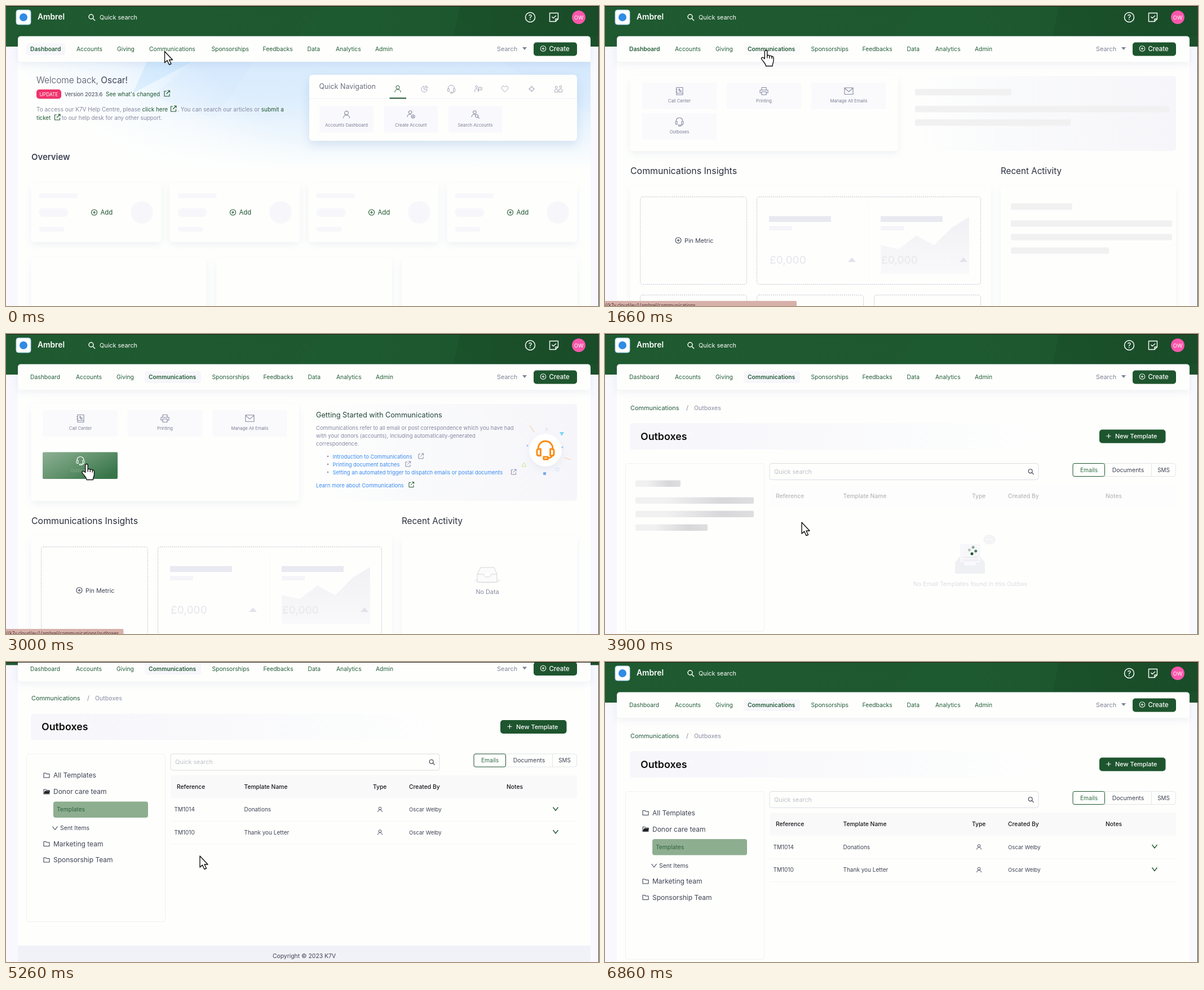
These frames come from a looping animation (1052x532 px, 7.86 s). An HTML page:

```html
<!DOCTYPE html>
<html lang="en">
<head>
<meta charset="utf-8">
<title>Outbox walkthrough</title>
<style>
  html, body { margin: 0; width: 100%; height: 100%; overflow: hidden; background: #f8f8fe; }
  svg { display: block; width: 100vw; height: 100vh; font-family: Inter, "Open Sans", sans-serif; }
</style>
</head>
<body>
<svg id="stage" viewBox="0 0 1052 532"></svg>
<script>
const LOOP = 7860;
const GREEN = '#1e552e', INK = '#3f4254', GREY = '#8688a0', PAPER = '#fefffd', PALE = '#f7f7fb', BLUE = '#3a8bee';

// Drawing helpers: each returns SVG markup
const T = (x, y, s, size, fill = INK, weight = 400, anchor = 'start') =>
  `<text x="${x}" y="${y}" font-size="${size}" fill="${fill}" font-weight="${weight}" text-anchor="${anchor}">${s}</text>`;
const R = (x, y, w, h, fill, r = 0, extra = '') =>
  `<rect x="${x}" y="${y}" width="${w}" height="${h}" rx="${r}" fill="${fill}" ${extra}/>`;
const C = (x, y, r, fill, extra = '') => `<circle cx="${x}" cy="${y}" r="${r}" fill="${fill}" ${extra}/>`;
const P = (d, fill, extra = '') => `<path d="${d}" fill="${fill}" ${extra}/>`;
const G = (id, body, extra = '') => `<g id="${id}" ${extra}>${body}</g>`;
const span = (s, fill, weight = 400) => `<tspan fill="${fill}" font-weight="${weight}">${s}</tspan>`;
const card = (x, y, w, h, id = '') => R(x, y, w, h, PAPER, 5, `filter="url(#shadow)" ${id && `id="${id}"`}`);
const dashed = (x, y, w, h) => R(x, y, w, h, 'none', 4, 'stroke="#b9bac6" stroke-dasharray="2 1.5" stroke-width=".9"');
const ring = r => `M${-r} 0a${r} ${r} 0 1 0 ${2 * r} 0a${r} ${r} 0 1 0 ${-2 * r} 0`;

const ICONS = {
  plus: ring(5) + 'M-2.5 0H2.5M0-2.5V2.5',
  cross: 'M-4 0H4M0-4V4',
  search: 'M-5-1a4 4 0 1 0 8 0a4 4 0 1 0-8 0M2 2L6 6',
  link: 'M-1-4H-4.5V5H4.5V1M1-5H5V-1M5-5L-1 1',
  person: 'M-3.3-2.8a3.3 3.3 0 1 0 6.6 0a3.3 3.3 0 1 0-6.6 0M-5.5 6.5C-5.5-1 5.5-1 5.5 6.5',
  personAdd: 'M-4-4a2.8 2.8 0 1 0 5.6 0a2.8 2.8 0 1 0-5.6 0M-6.5 4.5C-6.5 0-3-1 0-.4M1 3.5a3 3 0 1 0 6 0a3 3 0 1 0-6 0M2.5 3.5h3M4 2v3',
  personFind: 'M-4-4a2.8 2.8 0 1 0 5.6 0a2.8 2.8 0 1 0-5.6 0M-6.5 4.5C-6.5 0-3-1 0-.4M0 2.5a2.5 2.5 0 1 0 5 0a2.5 2.5 0 1 0-5 0M4.5 4.5L7 7',
  pie: 'M-1-5A5.5 5.5 0 1 0 5 1H-1ZM2-6A5 5 0 0 1 6-2H2Z',
  headset: 'M-6 0V-1a6 6 0 0 1 12 0V0M-7 1Q-7-.5-5.500-.5H-4V5H-5.500Q-7 5-7 3.500ZM7 1Q7-.5 5.500-.5H4V5H5.500Q7 5 7 3.500ZM5.500 5Q5 7 2 7M-1.500 6H2V8H-1.500Z',
  talk: 'M-5-4a2 2 0 1 0 4 0a2 2 0 1 0-4 0M-6 6V1Q-3-2 0 1V6M1-3H7V2H3L1 3ZM3-.5H5',
  heart: 'M0 6L-5 .8C-8.5-3.5-3-8 0-3.5C3-8 8.5-3.5 5 .8Z',
  target: ring(3.8) + 'M0-6V-2M0 6V2M-6 0H-2M6 0H2',
  group: 'M-6-3a2 2 0 1 0 4 0a2 2 0 1 0-4 0M2-4a2 2 0 1 0 4 0a2 2 0 1 0-4 0M-7 6V2Q-4-1-1 2V6ZM1 6V1Q4-2 7 1V6Z',
  book: 'M-5-6.5H6V6.5H-5ZM-5 3.5H6M-7-3H-4M-7 1H-4M-1-4Q-2 1 3 1L3-1L1-1L0-4Z',
  printer: 'M-4-2V-6.5H4V-2M-4 3H-7V-2H7V3H4M-4 1H4V6.5H-4Z',
  mail: 'M-7.5-6H7.5V5.5H-7.5ZM-7.5-5.5L0 1L7.5-5.5',
  folder: 'M-5-4H-1L0-2.5H5V4H-5Z',
  chevron: 'M-4.5-3L0 3L4.5-3',
  note: 'M-7.5-7.5H7.5V3L3 7.5H-7.5ZM7 3H3V7M-3.5-1L-1 1.5L4-3'
};
const icon = (name, x, y, color = GREY, scale = 1, width = 1.1) =>
  P(ICONS[name], 'none', `transform="translate(${x} ${y}) scale(${scale})" stroke="${color}" stroke-width="${width}" stroke-linejoin="round"`);

const header = () =>
  R(0, 0, 1052, 72, 'url(#green)') +
  P('M560 0H800L850 72H500Z', '#2b7040', 'opacity=".06"') +
  P('M806 0L794 53H1052V0Z', '#123a1e', 'opacity=".16"') +
  R(18, 7, 26, 26, '#fff', 4, 'stroke="#9fd0ee"') + C(31, 20, 7, '#2f8be6') +
  T(56, 24, 'Ambrel', 13.8, '#fff', 600) +
  icon('search', 152, 20, '#fff', 1, 1.5) + T(166, 23.5, 'Quick search', 10.8, '#fff') +
  C(930, 20, 8.5, 'none', 'stroke="#fff" stroke-width="1.5"') + T(930, 24.5, '?', 12.5, '#fff', 500, 'middle') +
  icon('note', 972, 20, '#fff', 1, 1.4) +
  C(1016, 20, 12, '#f857ab') + T(1016, 23.5, 'OW', 9.5, '#fff', 400, 'middle');

const NAV = ['Dashboard', 'Accounts', 'Giving', 'Communications', 'Sponsorships', 'Feedbacks', 'Data', 'Analytics', 'Admin'];
const NAV_X = {
  home: [43, 125, 197, 254, 364.5, 455.5, 534.5, 585, 655],
  comm: [43, 124, 196, 253, 365.5, 456.5, 535.5, 586, 656]
};
const nav = () =>
  R(21, 53.5, 1016, 45.5, PAPER, 5, 'filter="url(#shadow)"') +
  R(36, 66, 69, 21, PALE, 4, 'id="homePill"') + R(246, 66, 100, 21, PALE, 4, 'id="commPill"') +
  G('links', NAV.map(s => T(0, 80, s, 10.3, '#245c38')).join('')) +
  T(871, 80, 'Search', 10.9, '#7f8298') + P('M916 73H924L920 78Z', '#7f8298') +
  R(936, 64.5, 77, 24, GREEN, 5) + icon('plus', 953, 75.5, '#fff', .95) + T(963.5, 80, 'Create', 11.4, '#fff', 500);

const dashboard = () => {
  const tabs = ['person', 'pie', 'headset', 'talk', 'heart', 'target', 'group'];
  const tiles = [['person', 'Accounts Dashboard'], ['personAdd', 'Create Account'], ['personFind', 'Search Accounts']];
  let out = R(21, 99, 1016, 195, 'url(#sky)') +
    P('M250 99H330L225 155Z', '#b5dbfa', 'opacity=".4"') + P('M330 99H440L370 200L260 160Z', '#c6e2fb', 'opacity=".2"') +
    P('M520 99H760L540 240L410 200Z', '#d5eafc', 'opacity=".25"') + P('M880 99H1037V190L960 150Z', '#c6e2fb', 'opacity=".2"') +
    R(21, 99, 1016, 195, 'url(#skyFade)') +
    T(54, 137, span('Welcome back, ', '#4a4d60', 300) + span('Oscar!', INK), 15.4) +
    R(54, 148, 44, 16.5, '#f0326b', 5) + T(76, 159.5, 'UPDATE', 8.4, '#fff', 400, 'middle') +
    T(104, 160, 'Version 2023.6', 9.4) + T(177, 160, "See what's changed", 10, GREEN) + icon('link', 285.5, 155, GREEN) +
    T(54, 187, 'To access our K7V Help Centre, please ' + span('click here', GREEN), 10, GREY) + icon('link', 297, 182, GREEN) +
    T(304, 187, '. You can search our articles or ' + span('submit a', GREEN), 9.95, GREY) +
    T(54, 202, 'ticket', 9.8, GREEN) + icon('link', 91, 197, GREEN) + T(99, 202, 'to our help desk for any other support.', 9.8, GREY) +
    R(538, 122, 475, 117, PAPER, 6, 'filter="url(#blueShadow)"') + T(555.5, 147, 'Quick Navigation', 12.5, '#6b6f83') +
    R(538, 163.5, 475, 1, '#eff0f5') + R(680.5, 162.5, 29.5, 2, GREEN);
  tabs.forEach((name, i) => out += icon(name, 695 + 47.5 * i, 147, i ? '#a3a5b7' : GREEN, .95, 1));
  tiles.forEach(([name, label], i) => {
    const x = 604 + 114.3 * i;
    out += R(x - 48, 177, 96, 47.5, '#f9f9fd', 3) + icon(name, x, 192.5) + T(x, 213.5, label, 7.7, '#7b7e93', 400, 'middle');
  });
  out += T(45, 272.5, 'Overview', 14.9, INK, 600);
  for (let i = 0; i < 4; i++) {
    const x = 44.5 + 246 * i;
    out += card(x, 314, 230.5, 104.5) + R(x + 14, 332, 69, 9, PALE, 4) + R(x + 14, 358.5, 52, 15.5, PALE, 7) +
      R(x + 14, 391.5, 45, 8.5, PALE, 4) + C(x + 196.5, 366, 20, PALE) + icon('plus', x + 112, 366, GREEN) + T(x + 123, 370, 'Add', 11.4, GREEN);
  }
  for (let i = 0; i < 3; i++) out += card(44.5 + 329 * i, 447, 311, 120);
  return out;
};

const bones = (x, y, widths) =>
  widths.map((w, i) => R(x, y + (i ? 6 + 24 * i : 0), w, 11.5, 'url(#shimmer)', 2)).join('');

const tile = (x, y, name, label) =>
  R(x - 66.5, y, 133, 47, '#fafafd', 2) + icon(name, x, y + 15) + T(x, y + 35.5, label, 7.7, '#7b7e93', 400, 'middle');

const metric = x =>
  R(x, 372.5, 110, 10.5, '#e9e9f1') + R(x, 390, 41, 8, '#f5f5f9') +
  T(x + 1, 456.5, '£0,000', 18.8, '#e8e8ee', 500) + P(`M${x + 140} 454H${x + 154}L${x + 147} 446Z`, '#e2e2ea');

const link = (x, y, s, end) => T(x, y, s, 9.35, BLUE) + icon('link', end, y - 4, GREY, .9);

const guide = () =>
  T(550, 148, 'Getting Started with Communications', 12.7, '#24463a') +
  ['Communications refer to all email or post correspondence which you have had',
   'with your donors (accounts), including automatically-generated', 'correspondence.']
    .map((s, i) => T(550, 170 + 14 * i, s, 9.45, GREY)).join('') +
  [217, 231, 245].map(y => C(571, y, 1.3, GREY)).join('') +
  link(579.5, 220.5, 'Introduction to Communications', 736) + link(579.5, 234.5, 'Printing document batches', 713) +
  link(579.5, 248.5, 'Setting an automated trigger to dispatch emails or postal documents', 900.5) +
  T(550, 271.5, 'Learn more about Communications', 9.4, BLUE) + icon('link', 719, 267, GREEN, .9) +
  C(957, 206, 29, '#fff', 'filter="url(#shadow)"') + icon('headset', 957, 205, '#fa8c16', 2.15, 1.35) +
  P('M929 162L937 174M990 219L1002 223', 'none', 'stroke="#fbc9a4" stroke-width="1.2"') +
  P('M982 174H990L986 181Z', '#7fd6f0') + P('M915 235L919 228L923 235Z', 'none', 'stroke="#c6e58c"') +
  C(959, 169, 2, 'none', 'stroke="#ddd"') + C(978, 240, 2.8, 'none', 'stroke="#cfe0f8"') +
  C(925, 198, 1.5, '#9db9f5') + C(987, 201, 1.5, '#8fc0f5') + R(953, 245, 5, 5, '#7ba8f0', 1);

const communications = () =>
  card(44.5, 124, 475.5, 133, 'tools') +
  G('topTiles', tile(132, 136, 'book', 'Call Center') + tile(282, 136, 'printer', 'Printing') + tile(432.5, 136, 'mail', 'Manage All Emails')) +
  G('outboxTile', tile(132, 190, 'headset', 'Outboxes') +
    G('tileHover', R(65, 190, 133, 47.5, 'url(#hover)', 2) + icon('headset', 132, 205, '#fff') +
      T(132, 225.5, 'Outboxes', 7.7, '#83ad89', 400, 'middle'))) +
  R(532, 124, 481, 133, 'url(#panel)', 5, 'id="panel"') +
  G('guideBones', bones(550, 147, [171, 451, 276])) + G('guide', guide()) +
  G('insights',
    T(45, 297.5, 'Communications Insights', 15.9, '#2b2e3d') + T(702, 297.5, 'Recent Activity', 15.2, '#2b2e3d') +
    card(44.5, 320, 640.5, 260) + card(702, 320, 311, 260) +
    dashed(62.5, 338.5, 189, 155) + dashed(269.5, 338.5, 397, 155) +
    [62.5, 269.5, 477.5].map(x => dashed(x, 512.5, 189, 120)).join('') +
    icon('plus', 130, 415.5, INK) + T(141, 420, 'Pin Metric', 10.8) +
    R(468, 348, 1, 136, '#f7f7fa') +
    P('M489 424L521 431L552 407L584 424L615 393L646 374V475H489Z', 'url(#chart)') + metric(291) + metric(489) +
    G('activityBones', bones(720, 350, [109, 286, 286, 174])) +
    G('noData', '<ellipse cx="854" cy="398.5" rx="23" ry="5" fill="#f4f4f6"/>' +
      P('M836 387L842 375H866L871 387V401H836ZM836 387H847Q848 392 854 392Q860 392 861 387H871', '#fbfbfc', 'stroke="#d5d5da"') +
      T(854, 421.5, 'No Data', 10.8, GREY, 400, 'middle')));

const treeRow = (y, s, open) =>
  icon('folder', 72, y, INK) + (open ? P('M67 300L69 295H78L76 300Z', '#222') : '') + T(84, y + 4, s, 12, INK);

const tableRow = (y, id, name) =>
  T(298.5, y, id, 10) + T(422.5, y, name, 10) + icon('person', 663.5, y - 3.5, INK, .7, 1.4) +
  T(715, y, 'Oscar Welby', 9.6) + icon('chevron', 975, y - 4.5, GREEN, 1, 1.3) + R(292, y + 17, 721, 1, '#f3f3f5');

const outboxes = () =>
  T(45, 134.5, 'Communications', 10.9, '#24583a') + T(144, 134.5, '/', 10.9, GREY) + T(158, 134.5, 'Outboxes', 10.6, GREY) +
  R(44, 158, 786, 47, 'url(#banner)', 5) + T(63, 187.5, 'Outboxes', 17.8, '#0c0d0c', 600) +
  R(877, 169.5, 117.5, 24, GREEN, 5) + icon('cross', 893.5, 181, '#fff') + T(905, 185, 'New Template', 10.9, '#fff', 500) +
  R(36.5, 229.5, 246, 297.5, PAPER, 4, 'stroke="#eff0f2"') +
  G('treeBones', bones(54, 259.5, [80, 210, 210, 128])) +
  G('tree', treeRow(267.5, 'All Templates') + treeRow(296.5, 'Donor care team', true) +
    R(84, 314, 168, 28.5, '#8eae90', 4) + T(90, 331.5, 'Templates', 10.3, '#2f6240') +
    icon('chevron', 87, 361, INK) + T(96, 364.5, 'Sent Items', 10.4) +
    treeRow(389, 'Marketing team') + treeRow(417.5, 'Sponsorship Team')) +
  R(292, 229.5, 477, 29, PAPER, 4, 'stroke="#dcdde0"') + T(300, 247.5, 'Quick search', 10.8, '#bfc0c6') + icon('search', 755.5, 244, INK, .85, 1.4) +
  R(830, 229.5, 182.5, 23, PAPER, 4, 'stroke="#e3e4e8"') + R(969, 230, 1, 23, '#e3e4e8') +
  R(830, 229.5, 56.5, 23, PAPER, 3, `stroke="${GREEN}"`) +
  T(858.5, 244.5, 'Emails', 10.2, '#2f6a45', 400, 'middle') + T(928, 244.5, 'Documents', 10.5, INK, 400, 'middle') + T(991, 244.5, 'SMS', 9.8, INK, 400, 'middle') +
  G('table', R(292, 267.5, 721, 40.5, '#f9f9fa', 2) +
    [['Reference', 303], ['Template Name', 422.5], ['Type', 651], ['Created By', 715], ['Notes', 888]]
      .map(([s, x]) => T(x, 291, s, 10.3, '#17181c', 500)).join('') +
    G('rows', tableRow(331.5, 'TM1014', 'Donations') + tableRow(372, 'TM1010', 'Thank you Letter'))) +
  G('empty', P('M621 405L629 395H666L674 405V425H621Z', '#eff0f4') + R(630, 372, 36, 33, '#f7f7fa', 2) +
    P('M635 396H662M635 401H662', 'none', 'stroke="#e9e9ef" stroke-width="1.5"') + R(637, 405, 21, 5, '#fafafc', 2) +
    '<ellipse cx="682" cy="364.5" rx="11" ry="9" fill="#f4f4f7"/>' + T(682, 366, '•••', 7, '#fff', 400, 'middle') +
    T(648, 447, 'No Email Templates found in this Outbox', 10.6, '#dcdce4', 400, 'middle') +
    G('spinner', [1, .75, .5, .3].map((o, i) =>
      C(0, 5.8, 2.5, GREEN, `opacity="${o}" transform="rotate(${-90 * i})"`)).join(''))) +
  R(21, 569.5, 1016, 40, '#f1f2f7') + T(529, 591.5, 'Copyright © 2023 K7V', 10.4, INK, 400, 'middle');

const stops = list => list.map(([o, c, a = 1]) => `<stop offset="${o}" stop-color="${c}" stop-opacity="${a}"/>`).join('');
const gradient = (id, list, dir = 'x2="1"') => `<linearGradient id="${id}" ${dir}>${stops(list)}</linearGradient>`;
const shadow = (id, color, dy, blur) =>
  `<filter id="${id}" x="-20%" y="-30%" width="140%" height="190%" color-interpolation-filters="sRGB">
    <feDropShadow dx="0" dy="${dy}" stdDeviation="${blur}" flood-color="${color}"/></filter>`;

const stage = document.getElementById('stage');
stage.innerHTML = '<defs>' +
  gradient('green', [[0, '#1f5a30'], [.6, '#1e582f'], [1, '#1b502b']]) +
  gradient('sky', [[0, PAPER], [.55, '#eff7fe'], [1, '#d8ebfd']], 'gradientUnits="userSpaceOnUse" x1="150" y1="230" x2="290" y2="60"') +
  gradient('skyFade', [[0, PAPER, 0], [.35, PAPER, .15], [1, PAPER]], 'x2="0" y2="1"') +
  gradient('panel', [[0, PALE, 0], [.35, PALE, .6], [1, '#f6f6fa']]) +
  gradient('banner', [[0, '#f6f6fb'], [.4, '#f9f9fc'], [1, PAPER]]) +
  gradient('hover', [[0, '#8db095'], [.5, '#65956f'], [1, '#38764a']], 'x2="1" y2=".7"') +
  gradient('chart', [[0, '#f1f1f5'], [1, '#f9f9fb']], 'x2="0" y2="1"') +
  gradient('shimmer', [[.25, '#f1f1f2'], [.37, '#d8d8da'], [.63, '#f1f1f2']]) +
  shadow('shadow', 'rgba(70,80,140,.08)', 5, 7) + shadow('blueShadow', 'rgba(60,110,180,.16)', 7, 9) + '</defs>' +
  R(0, 0, 1052, 532, '#f8f8fe') +
  G('page', header() + R(21, 72, 1016, 600, PAPER) + G('home', dashboard()) + G('comm', communications()) + G('out', outboxes())) +
  G('nav', nav()) +
  G('status', R(-4, 523, 344, 14, '#d8b0aa', 2, 'id="statusBar"') +
    '<text id="address" y="533.5" font-size="8.4" fill="#4b3431" font-family="Noto Sans, sans-serif"></text>') +
  R(0, 0, 1052, 1, '#1d211e') + R(1051, 0, 1, 532, '#3a3d3b') +
  G('cursor',
    P('M0 0V20L4.5 16L8 23.5L11.5 22L8 15H14Z', '#fff', 'id="arrow"') +
    P('M-2.2 2.2C-2.2-.8 2.2-.8 2.2 2.2V10C3 8 6 8.5 6.3 10.5C7 9 10 9.5 10.3 11.5C11 10.2 13.5 11 13.5 13.5V18C13.5 22 11.5 23 11.5 28H0C0 24-5 20-7.5 16C-9.5 13-5.5 11-2.2 15ZM2.2 10V14M6.3 10.5V14.5M10.3 11.5V15', '#fff', 'id="hand"'),
    'stroke="#111" stroke-width="1.4" stroke-linejoin="round"');

const el = Object.fromEntries([...stage.querySelectorAll('[id]')].map(n => [n.id, n]));
const links = [...el.links.children], shimmer = el.shimmer;

// Timing helpers
const ramp = (t, a, b) => Math.min(1, Math.max(0, (t - a) / (b - a)));
const ease = (t, a, b) => { const k = ramp(t, a, b); return k * k * (3 - 2 * k); };
const within = (t, a, b) => t >= a && t < b;
const fade = (node, v) => { node.style.opacity = v; };
const show = (node, on) => { node.style.display = on ? '' : 'none'; };
const move = (node, x, y) => node.setAttribute('transform', `translate(${x} ${y})`);

// Each move: start, end, destination
const MOVES = [[30, 360, 283, 76], [630, 700, 285.5, 78.5], [2260, 2760, 143, 230.5], [3200, 3900, 349, 334],
  [4000, 4260, 344, 344], [5930, 6360, 333.5, -15], [6800, 6860, 333.5, -40]];

function cursorAt(t) {
  let x = 281.5, y = 80.5;
  for (const [a, b, toX, toY] of MOVES) {
    const k = ease(t, a, b);
    x += (toX - x) * k;
    y += (toY - y) * k;
  }
  return [x, y];
}

function draw(t) {
  const atHome = t < 1600, atOut = t >= 3300, loaded = t >= 2000, listed = t >= 3930;
  const scroll = ease(t, 4700, 4930) - ease(t, 5300, 5460);
  move(el.page, 0, -66.5 * scroll);
  move(el.nav, 0, -64.5 * scroll);

  show(el.home, atHome);
  show(el.comm, !atHome && !atOut);
  show(el.out, atOut);
  fade(el.comm, .4 + .6 * ramp(t, 1600, 1660));
  fade(el.out, ramp(t, 3300, 3450));

  const xs = atHome ? NAV_X.home : NAV_X.comm;
  links.forEach((node, i) => {
    const bold = i === 0 ? t < 1750 : i === 3 && !atHome;
    node.setAttribute('x', xs[i]);
    node.setAttribute('font-weight', bold ? 600 : 400);
  });
  fade(el.homePill, 1 - ramp(t, 1460, 1660));
  fade(el.commPill, ramp(t, 1580, 1760));

  // Communications: the guide's arrival makes the top row taller
  const grow = loaded ? 39 : 0;
  el.tools.setAttribute('height', 133 + grow);
  el.panel.setAttribute('height', 133 + grow);
  move(el.topTiles, 0, -1.2 * ramp(t, 1660, 1760));
  move(el.outboxTile, 0, grow / 2);
  move(el.insights, 0, grow);
  show(el.guideBones, !loaded);
  show(el.guide, loaded);
  show(el.activityBones, t < 2230);
  show(el.noData, t >= 2230);
  fade(el.tileHover, ease(t, 2700, 2960));

  // Outboxes: placeholders, then the dimmed table brightens
  show(el.treeBones, !listed);
  show(el.tree, listed);
  show(el.rows, listed);
  show(el.empty, !listed);
  fade(el.table, listed ? .5 + .5 * ease(t, 4000, 4260) : .3);
  el.spinner.setAttribute('transform', `translate(652 384) rotate(${(t - 3900) * .3 + 10})`);

  const phase = ((t - (t < 3200 ? 1600 : 3200) + 1400) % 1400) / 1400;
  const left = -3 + 3 * (1 - (1 - phase) ** 2);
  shimmer.setAttribute('x1', left);
  shimmer.setAttribute('x2', left + 4);

  // Link address at the lower left
  const second = t >= 2500;
  el.statusBar.setAttribute('width', second ? 212.5 : 344);
  el.address.textContent = '//k7v.cloud/eu1/ambrel/communications' + (second ? '/outboxes' : '');
  fade(el.status, second ? ramp(t, 2880, 3000) * (t < 3350) : ramp(t, 150, 360) * (t < 2000));

  const hand = within(t, 200, 2330) || within(t, 2700, 3350);
  show(el.hand, hand);
  show(el.arrow, !hand);
  move(el.cursor, ...cursorAt(t));
}

function frame() {
  draw(performance.now() % LOOP);
  requestAnimationFrame(frame);
}
frame();
</script>
</body>
</html>
```
